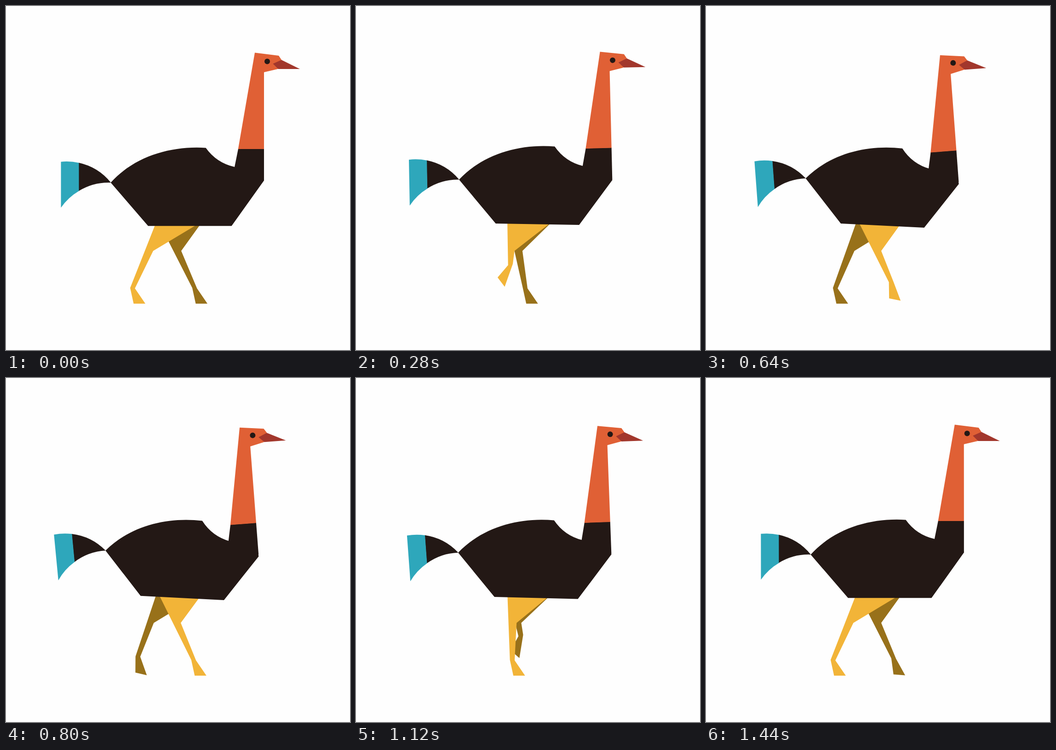
Write an HTML page that moves like this. It is 748x748 px and loops after 1.48 s.

```html
<!DOCTYPE html>
<html lang="en">
<head>
<meta charset="utf-8">
<title>Walking bird</title>
<style>
  html, body { margin: 0; width: 100%; height: 100%; overflow: hidden; background: #fefefe; }
  svg { display: block; width: 100vw; height: 100vh; }
  .ink { fill: #231815; }
  .skin { fill: #e06035; }
  .beak { fill: #a2372c; }
  .teal { fill: #2ea7bb; }
  .near { fill: #f2b438; }
  .far { fill: #98711a; }
</style>
</head>
<body>
<svg viewBox="0 0 748 748">
  <polygon id="far" class="far"/>
  <polygon id="near" class="near"/>
  <g id="body">
    <g id="tail">
      <path class="ink" d="M158 340.8A124 124 0 0 1 228 384A124 124 0 0 0 158 402.3Z"/>
      <path class="teal" d="M119.5 338.7A124 124 0 0 1 158.5 341V402.2A124 124 0 0 0 119.5 438.5Z"/>
    </g>
    <path class="ink" d="M227.7 384C279.5 327 358 303.6 434.5 308.5A105 105 0 0 0 497 350L545 365L559.8 374L561 379.5L490.5 478.3H309Z"/>
  </g>
  <g id="neck">
    <path class="ink" d="M505 310.5H561V379.5L526 390L497 350Z"/>
    <path class="skin" d="M541 101.5L593 108L599 117L591 137L561 144V311H504.8Z"/>
    <path class="beak" d="M599 117.3L639 137H592L580.5 125.5Z"/>
    <circle class="ink" cx="568" cy="120.5" r="6"/>
  </g>
</svg>
<script>
const LOOP = 1480, HALF = LOOP / 2, STEP = 40;
const RAD = Math.PI / 180;
const $ = id => document.getElementById(id);
const mix = (a, b, u) => a + (b - a) * u;
const ease = u => (1 - Math.cos(Math.PI * Math.min(1, Math.max(0, u)))) / 2;

// Eased 0 to 1 to 0, with the crest at the given time
const swell = (t, crest, end) => ease(t < crest ? t / crest : (end - t) / (end - crest));

// Foot lifted and carried forward
function swing(t) {
  const p = t / HALF;
  return {
    knee: mix(320, 381, ease(t / 640)),
    x: mix(270, 405, p + 0.8 * p * p * (1 - p)),
    lift: swell(t, 340, HALF) ** 0.75,
    turn: 62 * Math.min(ease(t / 200), (HALF - t) / 540)
  };
}

// Foot flat, sliding back
function stance(t) {
  const u = ease(t / HALF);
  return { knee: mix(381, 320, u), x: mix(405, 270, u), lift: 0, turn: 0 };
}

function drawLeg(id, t) {
  t %= LOOP;
  const { knee, x, lift, turn } = t < HALF ? swing(t) : stance(t - HALF);
  const y = 613 - 52.5 * lift;
  const c = Math.cos(turn * RAD), s = Math.sin(turn * RAD);
  const foot = (dx, dy) => [x + dx * c - dy * s, y + dx * s + dy * c];
  $(id).setAttribute('points', [
    [329, 464], [427.5, 468], [knee, 532.5],
    [x + 10.3, y + 1 - 4 * lift],
    foot(33, 34.3), foot(7.5, 34.3), [x, y]
  ].join(' '));
}

function draw(t) {
  const sway = swell(t, HALF, LOOP);
  const x = -16.7 * sway, y = -4.3 * (t < HALF ? swell(t, HALF / 2, HALF) : 0);
  const lean = 3 * sway, c = Math.cos(lean * RAD), s = Math.sin(lean * RAD);
  // The neck's joint rides on the body
  const jx = 399.5 + x + 126.5 * c + 97 * s;
  const jy = 478 + y + 126.5 * s - 97 * c;

  $('body').setAttribute('transform', `translate(${x} ${y}) rotate(${lean} 399.5 478)`);
  $('tail').setAttribute('transform', `rotate(${-8.6 * swell(t, 880, LOOP)} 228 384)`);
  $('neck').setAttribute('transform',
    `translate(${jx} ${jy}) rotate(${-4.45 * sway}) translate(-526 -381)`);
  drawLeg('near', t);
  drawLeg('far', t + HALF);
}

function tick() {
  let step = Math.floor(performance.now() % LOOP / STEP);
  if (step === 12) step = 11; // this pose is held twice as long
  draw(step * STEP);
  requestAnimationFrame(tick);
}
tick();
</script>
</body>
</html>
```
